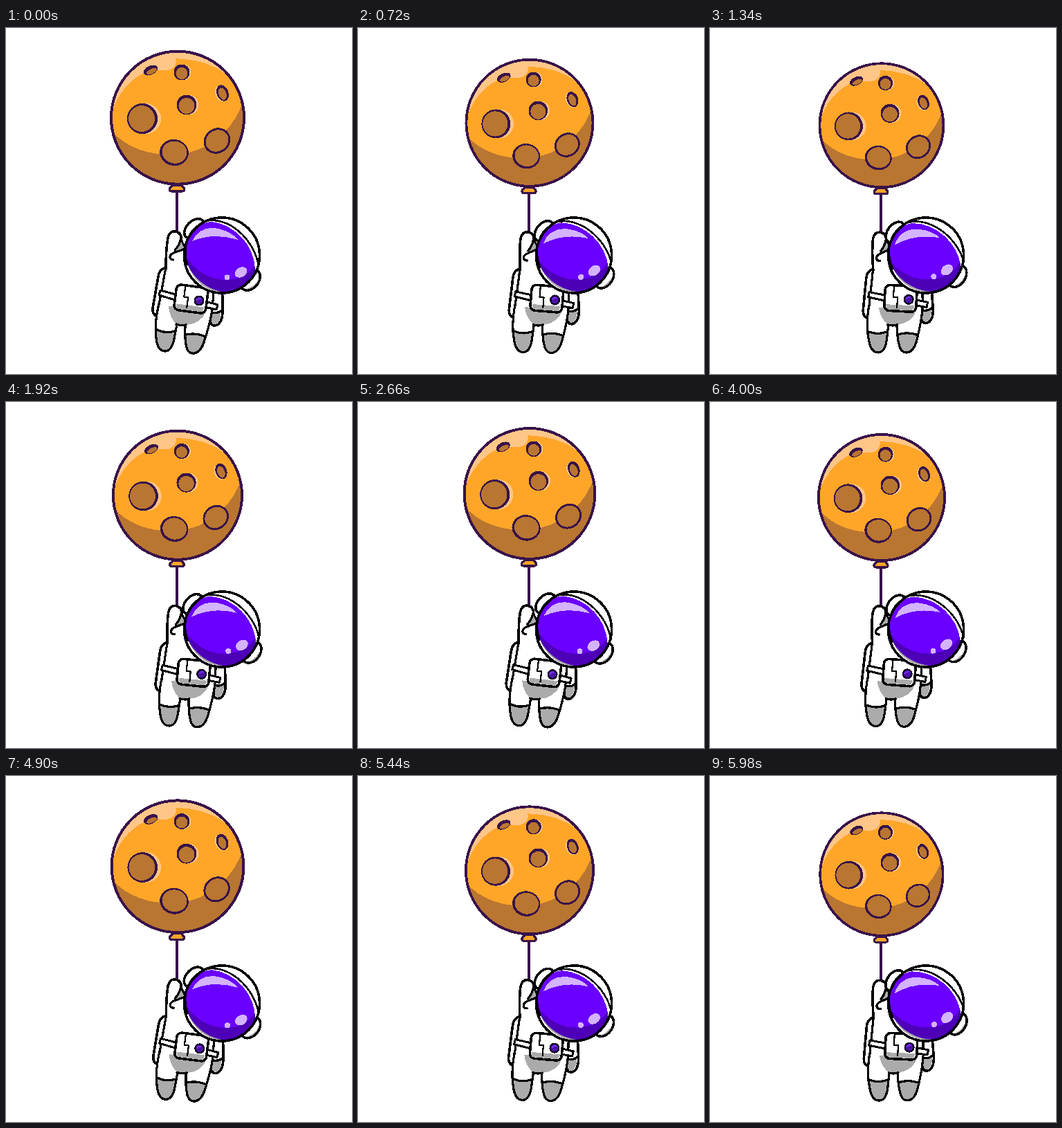
An HTML page for the animation above (6 s loop, 500 by 500 pixels).

```html
<!DOCTYPE html>
<html lang="en">
<head>
<meta charset="utf-8">
<title>Astronaut with a moon balloon</title>
<style>
  html, body { margin: 0; width: 100%; height: 100%; overflow: hidden; background: #fff; }
  svg { display: block; width: 100%; height: 100%; shape-rendering: crispEdges; }
  path, line { stroke-linecap: round; stroke-linejoin: round; }
  .ink { stroke: #000; stroke-width: 3.6; fill: #fff; }
  .line { stroke: #000; stroke-width: 3.2; fill: none; }
  .thin { stroke: #000; stroke-width: 2.2; fill: none; }
  .gray { fill: #ababab; }
  .plum { stroke: #38124a; stroke-width: 4; fill: none; }
  .dark { fill: #38124a; }
  .orange { fill: #ffa628; }
  .brown { fill: #b97631; }
  .peach { fill: #ffc688; }
  .lilac { fill: #d4b3ff; }
</style>
</head>
<body>
<svg viewBox="0 0 500 500">
  <defs>
    <path id="leftLeg" d="M221 398C217 415 215 434 217 448C218 459 222 467 230 467C237 467 241 459 243 449L247 428L250 398Z"/>
    <path id="rightLeg" d="M259 428C259 438 258 447 260 457C261 466 265 471 272 470C279 469 283 463 286 454C291 439 296 424 298 406L270 402Z"/>
    <ellipse id="ear" cx="353" cy="364" rx="17" ry="12" transform="rotate(-50 353 364)"/>
    <path id="visor" d="M258 318C261 297 279 280 298 280C332 284 360 316 360 350C356 371 338 382 317 382C284 378 257 350 258 318Z"/>
    <clipPath id="moonClip"><circle cx="248" cy="129.7" r="96"/></clipPath>
    <clipPath id="leftBoot"><use href="#leftLeg"/></clipPath>
    <clipPath id="rightBoot"><use href="#rightLeg"/></clipPath>
    <clipPath id="earClip"><use href="#ear"/></clipPath>
    <clipPath id="visorClip"><use href="#visor"/></clipPath>
  </defs>

  <g id="balloon">
    <line class="plum" x1="247" y1="236" x2="247" y2="297"/>
    <path class="orange" stroke="#38124a" stroke-width="3.5" d="M241 227H254Q255 230 257 231Q259 236 254 236H240Q235 236 237 231Q239 230 241 227Z"/>
    <g clip-path="url(#moonClip)">
      <path class="orange" d="M150 30H347V228H150Z"/>
      <path class="peach" d="M152 126C160 96 178 75 201 64C212 57 222 63 234 61C245 58 247 50 245 44C275 45 300 52 320 68L300 28H150Z"/>
      <path class="brown" d="M150 146C182 184 232 187 264 180C302 171 331 142 343 105L350 230H150Z"/>
    </g>
    <g id="craters"></g>
    <circle class="plum" cx="248" cy="129.7" r="96"/>
  </g>

  <g id="body">
    <path class="ink" d="M231 346C224 348 221 352 220 359L212 405Q211 414 219 417L225 400Z"/>
    <path class="ink" d="M300 379C308 377 313 381 313 389V409C313 421 309 429 302 430C296 430 294 425 296 417L298 402Z"/>
    <path class="gray" d="M297 413Q305 413 311 409C310 421 307 427 302 428C298 428 296 425 297 413Z"/>
    <path class="line" d="M298 411Q306 413 312 408"/>
    <use href="#leftLeg" fill="#fff"/>
    <use href="#rightLeg" fill="#fff"/>
    <path class="gray" clip-path="url(#leftBoot)" d="M210 435Q230 442 250 438V470H210Z"/>
    <path class="gray" clip-path="url(#rightBoot)" d="M250 443Q275 440 296 448V474H250Z"/>
    <use href="#leftLeg" class="line"/>
    <use href="#rightLeg" class="line"/>
    <path class="line" d="M218 436Q230 442 244 438M260 443Q275 440 288 446"/>
    <path fill="#fff" d="M232 335L222 400C227 420 240 429 247 429H259C276 430 294 421 297 405L300 372L265 330Z"/>
    <path class="gray" d="M235 402L290 408C285 422 273 429 259 429H247C240 422 235 412 235 402Z"/>
    <path class="line" d="M231 346L221 400M300 380L298 408M246 428Q253 431 260 429"/>
    <path class="ink" style="stroke-width:3" d="M223 379L245 385L244 393L221 386ZM288 395L306 400L304 407L287 403Z"/>

    <path class="ink" d="M231 348C231 333 232 314 234 303C236 296 240 293 245 294C251 295 254 300 253 306L260 322L272 360"/>
    <path class="gray" d="M252 307L258 319L248 324L244 321Z"/>
    <path class="line" d="M253 304Q250 315 244 321M256 320C246 324 237 325 237 331Q237 335 242 335"/>

    <g transform="rotate(7.5 267 391)">
      <rect class="ink" x="244.5" y="373" width="46" height="37" rx="7"/>
      <path class="gray" d="M247 401H288Q287 408 283 408H251Q247 408 247 401Z"/>
      <path class="thin" d="M257 375V390H263V405"/>
    </g>
    <circle cx="279" cy="394" r="6.3" fill="#4b12a8" stroke="#140428" stroke-width="2.5"/>
    <path fill="none" stroke="#7a2cff" stroke-width="2" d="M276 393Q277 390 281 391"/>
  </g>

  <g id="helmet">
    <ellipse class="ink" cx="272" cy="290" rx="17" ry="11" transform="rotate(-45 272 290)"/>
    <path class="gray" d="M267 296Q272 286 281 282L284 292L268 304Z"/>
    <use href="#ear" class="ink"/>
    <path class="gray" clip-path="url(#earClip)" d="M335 379Q358 379 367 359L372 388H335Z"/>
    <use href="#ear" class="line"/>
    <circle fill="#fff" cx="312" cy="328.5" r="54.5"/>
    <path class="gray" d="M259 325C263 360 286 381 312 382L330 380L285 345Z"/>
    <path class="line" style="stroke-width:2.6" d="M284 280C322 268 361 309 365 345"/>
    <use href="#visor" fill="#6a00ff"/>
    <path fill="#4d00b8" clip-path="url(#visorClip)" d="M255 322C270 352 295 364 318 364C338 364 352 356 362 340V390H255Z"/>
    <path class="thin" d="M262 342C257 325 258 300 276 286"/>
    <path class="lilac" d="M269 308C276 293 290 286 307 290C320 293 330 299 335 306C312 299 291 299 269 308Z"/>
    <ellipse class="lilac" cx="339.5" cy="353" rx="9.5" ry="7" transform="rotate(-30 339.5 353)"/>
    <circle class="lilac" cx="319.5" cy="360.5" r="4"/>
    <circle class="line" style="stroke-width:3.6" cx="312" cy="328.5" r="54.5"/>
  </g>
</svg>
<script>
  const $ = id => document.getElementById(id);

  // centre x, y, outer radii, tilt, shift of the floor inside the rim, glow shift
  const craters = [
    [197, 131, 22, 22, 0, -1, 0, 5],
    [243, 180, 21, 19, 10, 0.5, -0.5, 0],
    [305, 163, 20, 18, -35, 0, 0, 0],
    [261, 111, 14.5, 14.5, 0, 0, 1.5, 3],
    [254, 64, 11.5, 11.5, 0, 0, 1.5, 2],
    [313, 94, 8.5, 12, -20, -0.5, 1, -2],
    [209, 61, 11, 6.5, -25, 0.5, 2, 0]
  ];
  const ellipse = (name, x, y, rx, ry) =>
    `<ellipse class="${name}" cx="${x}" cy="${y}" rx="${rx}" ry="${ry}"/>`;

  $('craters').innerHTML = craters.map(([x, y, rx, ry, tilt, dx, dy, glow]) =>
    `<g transform="translate(${x} ${y}) rotate(${tilt})">
      ${ellipse('peach', glow, 0, rx, ry)}
      ${ellipse('dark', 0, 0, rx, ry)}
      ${ellipse('brown', dx, dy, rx - 3, ry - 3)}
    </g>`).join('');

  const LOOP = 6000, HALF = 1200;

  function draw(now) {
    const phase = now % LOOP / HALF % 2;
    const p = 1 - Math.abs(1 - phase);
    const set = (id, value) => $(id).setAttribute('transform', value);
    set('balloon', `translate(247 292) scale(${1 - 0.077 * p}) translate(-247 -292)`);
    set('body', `rotate(${-4.9 * p} 262 285)`);
    set('helmet', `rotate(${-8 * p} 312 328)`);
  }

  const begin = performance.now();
  function tick() {
    draw(performance.now() - begin);
    requestAnimationFrame(tick);
  }
  tick();
</script>
</body>
</html>
```
